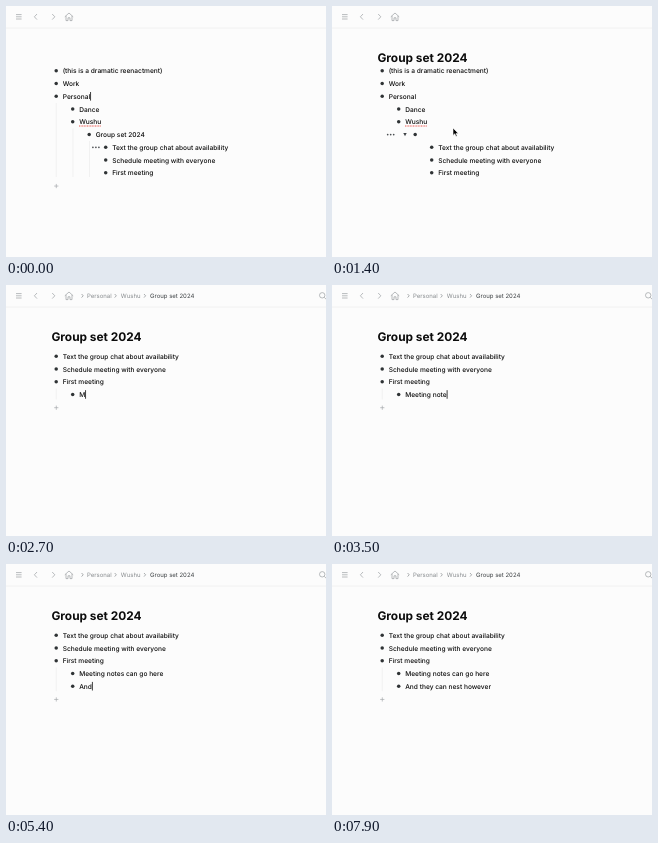
An HTML page for the animation above (8000 ms loop, 320 px wide and 251 px high).

```html
<!DOCTYPE html>
<html lang="en">
<head>
<meta charset="utf-8">
<title>Outline zoom</title>
<style>
  html, body { margin: 0; width: 100%; height: 100%; overflow: hidden; background: #fcfcfc; }
  svg { display: block; width: 320px; height: 251px; }
  text { font: 500 6.6px Inter, "Liberation Sans", sans-serif; fill: #0c0c0c; white-space: pre; text-rendering: geometricPrecision; }
  #title { font-size: 11.9px; font-weight: 700; }
  .crumb { font-size: 6px; font-weight: 400; fill: #85898c; }
  .here { fill: #3c4043; }
  .icon { fill: none; stroke: #9b9fa2; stroke-width: .7; }
  .sep { fill: none; stroke: #85898c; stroke-width: .7; }
  .guide { stroke: #ececec; stroke-width: .7; }
  .plus { stroke: #a5a9ac; stroke-width: .7; }
  .bullet { fill: #2f3335; }
  #caret { fill: #111; }
  #spell { stroke: #e8453c; stroke-width: .9; stroke-dasharray: 1 .6; }
</style>
</head>
<body>
<svg viewBox="0 0 320 251">
  <rect width="320" height="251" fill="#fcfcfc"/>
  <path d="M0 22H320" stroke="#ececec" stroke-width=".8"/>
  <g class="icon">
    <path d="M10 8.6h5.6M10 10.8h5.6M10 13h5.6"/>
    <path d="M31 8l-2.6 2.8 2.6 2.8M46.2 8l2.6 2.8-2.6 2.8"/>
    <path d="M58.8 10.8L63 7l4.2 3.8M60 9.9v4.7h2v-2.8h2v2.8h2v-4.7"/>
  </g>
  <g id="crumbs">
    <path class="sep" d="M75.6 9l1.6 1.8-1.6 1.8M108.7 9l1.6 1.8-1.6 1.8M138 9l1.6 1.8-1.6 1.8"/>
    <text class="crumb" x="81" y="13">Personal</text>
    <text class="crumb" x="114.8" y="13">Wushu</text>
    <text class="crumb here" x="144" y="13">Group set 2024</text>
    <g class="icon"><circle cx="316.2" cy="10.3" r="2.7"/><path d="M318.2 12.3l2.4 2.4"/></g>
  </g>
  <text id="title" x="45.4" y="56">Group set 2024</text>
  <path id="guides" class="guide" d="M50.3 97V171M67 122.5V171M83.5 135V171"/>
  <g id="outer"><path id="spell" d="M73 120H95"/></g>
  <g id="inner"></g>
  <g id="notes"><path id="noteGuide" class="guide"/></g>
  <path id="plus" class="plus" d="M-2.1 0h4.2M0 -2.1v4.2"/>
  <path id="fold" d="M-1.7 -1.5h3.4L0 1.8z" fill="#3c4043"/>
  <circle id="halo" r="4.4" fill="#777" opacity=".45"/>
  <g id="dots" fill="#4b4f52"><circle cx="-3" r=".85"/><circle r=".85"/><circle cx="3" r=".85"/></g>
  <rect id="caret" width=".8" height="8.6"/>
  <path id="mouse" d="M0 0V7.4L1.8 5.8L3 8.6L4.2 8.1L3 5.4H5.3Z" stroke="#fff" stroke-width=".6"/>
</svg>
<script>
const LOOP = 8000, STEP = 100, PITCH = 12.75, INDENT = 16.5, TOP = 65, ZOOM_TOP = 71.4;
const NS = "http://www.w3.org/2000/svg";
const $ = id => document.getElementById(id);
const bulletX = level => 50.2 + level * INDENT;
const textX = level => bulletX(level) + 6.5;

const el = (tag, attrs, parent) => {
  const node = document.createElementNS(NS, tag);
  for (const key in attrs) node.setAttribute(key, attrs[key]);
  return parent.appendChild(node);
};
const show = (node, on) => node.setAttribute("visibility", on ? "visible" : "hidden");
const place = (node, x, y) => node.setAttribute("transform", `translate(${x} ${y})`);

// share of the span from a to b that has passed at t
const part = (t, a, b) => Math.max(0, Math.min(1, (t - a) / (b - a)));
const smooth = p => p * p * (3 - 2 * p);
const mix = (a, b, p) => a + (b - a) * p;
const bend = (a, b, c, p) => mix(mix(a, b, p), mix(b, c, p), p);

function addRow(parent, label, level, y) {
  const bullet = el("circle", { class: "bullet", cx: bulletX(level), cy: y - .2, r: 1.75 }, parent);
  const text = el("text", { x: textX(level), y: y + 2.4 }, parent);
  text.textContent = label;
  return { bullet, text, level, y };
}

const rows = [
  ["(this is a dramatic reenactment)", 0], ["Work", 0], ["Personal", 0],
  ["Dance", 1], ["Wushu", 1], ["Group set 2024", 2],
  ["Text the group chat about availability", 3],
  ["Schedule meeting with everyone", 3], ["First meeting", 3]
].map(([label, level], i) => addRow($(level < 3 ? "outer" : "inner"), label, level, TOP + i * PITCH));
const [personal, group, firstChild, lastChild] = [2, 5, 6, 8].map(i => rows[i]);

// bursts: start, end, keys pressed (negative deletes)
const notes = [
  { label: "Meeting notes can go here", from: 2400,
    bursts: [[2600, 2700, 1], [2800, 3700, 13], [3800, 4600, 11]] },
  { label: "And they can nest however", from: 5100,
    bursts: [[5100, 5200, 1], [5300, 5800, 7], [5900, 6500, 10], [6700, 6900, 2],
      [7000, 7100, -2], [7100, 7500, 4], [7600, 7800, 3]] }
].map((note, i) => ({ ...note, ...addRow($("notes"), "", 1, ZOOM_TOP + (3 + i) * PITCH) }));

function typeNote({ bullet, text, label, from, bursts }, t) {
  const count = bursts.reduce((sum, [a, b, keys]) => sum + keys * part(t, a, b), 0);
  show(bullet, t >= from);
  text.textContent = label.slice(0, Math.ceil(count - .01));
}

function caretAt(row, on, dx = 0, dy = 0) {
  show($("caret"), on);
  const width = row.text.textContent ? row.text.getComputedTextLength() : 0;
  place($("caret"), textX(row.level) + width + dx, row.y - 4.5 + dy);
}

// dips, climbs to the group's bullet, then drifts right
function mouseAt(t) {
  const climb = smooth(part(t, 200, 900));
  const leave = smooth(part(t, 1100, 1400)), drift = part(t, 1400, 2100);
  return [
    bend(167, 165, 82.7, climb) + 38.3 * leave + 4 * drift,
    bend(179, 205, 128.6, climb) - 6.6 * leave
  ];
}

function drawHover(t, x, y) {
  let row = rows.find(r => Math.abs(r.y - y) < PITCH / 2);
  if (t < 100) row = firstChild;
  else if (t >= 900) row = t < 1600 ? group : null;
  const parent = row === group, settled = t >= 1900 && t < 2100;
  show($("dots"), row || settled);
  show($("fold"), parent);
  if (row) place($("dots"), bulletX(row.level) - (parent ? 24.5 : 9.8), row.y - .2);
  else place($("dots"), bulletX(0) - 9.8, ZOOM_TOP + 2 * PITCH);
  place($("fold"), bulletX(2) - 10.2, group.y - .2);
  place($("halo"), bulletX(2), group.y - .2);
  show($("halo"), parent && Math.hypot(x - bulletX(2), y - group.y) < 4.5);
}

function draw(t) {
  const [x, y] = mouseAt(t);
  show($("mouse"), t >= 100 && t < 2300);
  place($("mouse"), x, y);
  drawHover(t, x, y);

  const zooming = t >= 1100;
  show($("title"), zooming);
  show($("guides"), !zooming);
  show(group.text, !zooming);
  show($("crumbs"), t >= 1500);
  $("outer").setAttribute("opacity", 1 - part(t, 1400, 1700));

  const slide = 1 - (1 - part(t, 1400, 1900)) ** 3;
  const dx = -3 * INDENT * slide, dy = (ZOOM_TOP - firstChild.y) * slide;
  place($("inner"), dx, dy);

  for (const note of notes) typeNote(note, t);
  const nested = t >= 2500;
  notes[0].level = nested ? 1 : 0;
  notes[0].bullet.setAttribute("cx", bulletX(notes[0].level));
  const lines = 3 + notes.filter(note => t >= note.from).length;
  const end = zooming ? ZOOM_TOP + lines * PITCH : TOP + rows.length * PITCH;
  show($("noteGuide"), nested);
  $("noteGuide").setAttribute("d", `M50.3 103.5V${end - 8}`);
  show($("plus"), !zooming || t >= 1900);
  place($("plus"), 50.3, end + .3);

  if (t < 2300) caretAt(personal, t < 300);
  else if (t < 2400) caretAt(lastChild, true, dx, dy);
  else if (t < 5100) caretAt(notes[0], t < 4800);
  else caretAt(notes[1], t < 7900);
}

let start;
function tick(now) {
  start ??= now;
  draw(Math.floor((now - start) % LOOP / STEP) * STEP);
  requestAnimationFrame(tick);
}
draw(0);
requestAnimationFrame(tick);
</script>
</body>
</html>
```
